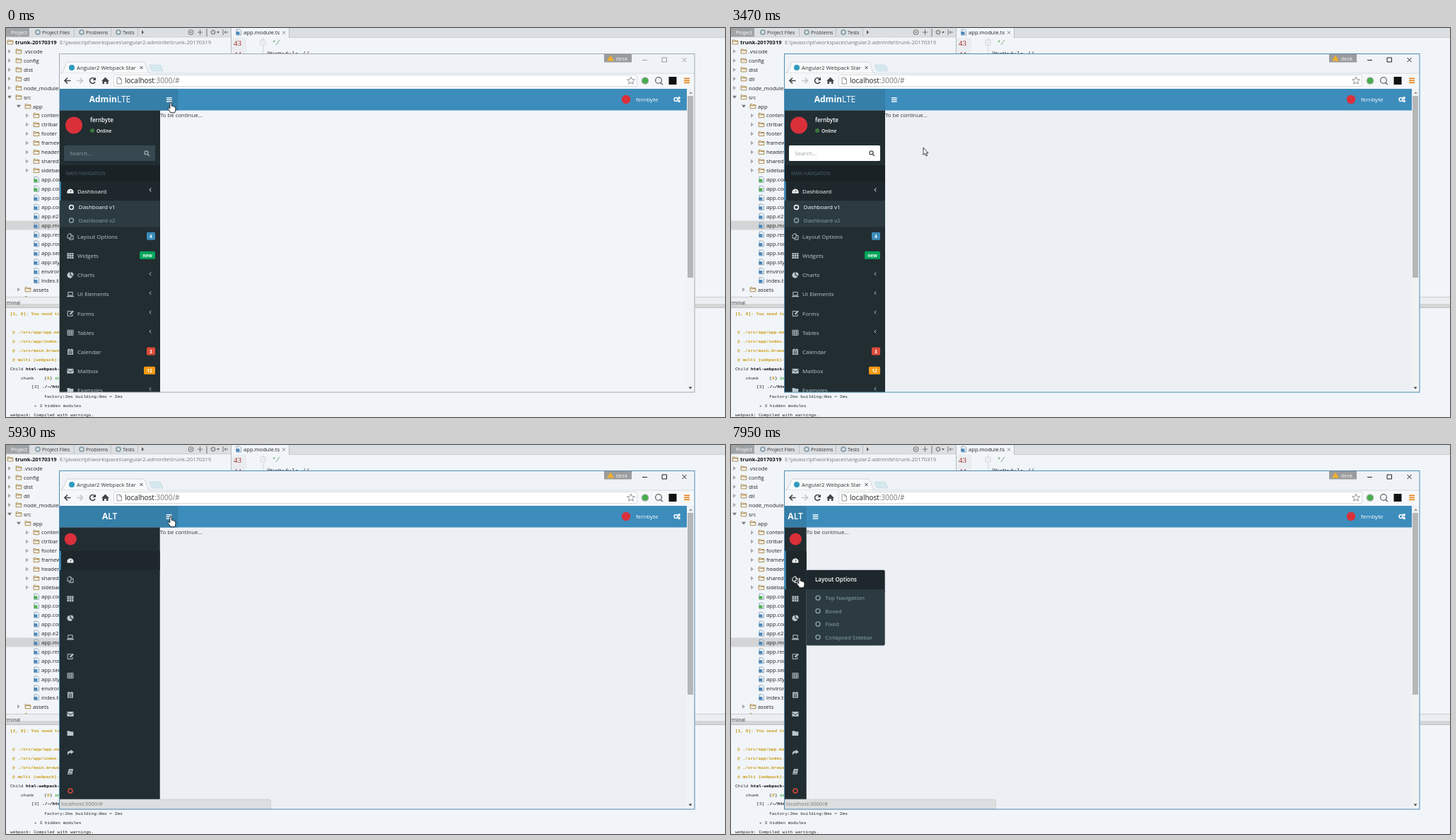
Write an HTML page that moves like this. It is 1017x550 px and loops after 8 s.

```html
<!DOCTYPE html>
<html lang="en">
<head>
<meta charset="utf-8">
<title>Admin dashboard sidebar</title>
<style>
html, body { margin: 0; width: 100%; height: 100%; overflow: hidden; background: #f1f5f9; }
svg { display: block; width: 1017px; height: 550px; }
text { font-family: "Open Sans", "Noto Sans", sans-serif; white-space: pre; }
.mono { font-family: "Liberation Mono", monospace; }
.row { color: #b8c7ce; }
.row .bg { opacity: 0; }
.row.on, .row.active { color: #fff; }
.row.on .bg, .row.active .bg { opacity: 1; }
.sub { color: #8aa4af; }
.sub.on, .sub.active { color: #fff; }
</style>
</head>
<body>
<svg id="stage" viewBox="0 0 1017 550" xmlns="http://www.w3.org/2000/svg"></svg>
<script>
const LOOP = 8000;
const ROW = 27.15;
const WIDE = 218, SLIM = 106.7;
const USER = "fernbyte";

// Bursts of screen updates: start, end, number of updates
const BURSTS = [
  [0, 0, 1], [150, 1190, 8], [1340, 2270, 8], [2390, 3040, 6], [3320, 3470, 2],
  [3750, 3750, 1], [4020, 4800, 7], [5930, 6870, 8], [6990, 7950, 8]
];

// Pointer path: time, x, y
const PATH = [
  [0, 233, 105], [150, 233, 108], [450, 222, 156], [600, 190, 180], [750, 175, 200],
  [1190, 165, 455], [1340, 165, 470], [1600, 162, 508], [1900, 190, 330], [2140, 225, 140],
  [2270, 233, 111], [2390, 225, 122], [2650, 160, 170], [2780, 135, 176], [3040, 130, 176],
  [3320, 200, 176], [3470, 272, 169], [3750, 272, 169], [4020, 266, 158], [4410, 240, 112],
  [4800, 233, 101], [6330, 233, 101], [6870, 165, 128], [7130, 106, 152], [7264, 97, 155],
  [7540, 97, 157], [7810, 97, 179], [7950, 97, 187]
];

const rect = (x, y, w, h, fill, more = "") =>
  `<rect x="${x}" y="${y}" width="${w}" height="${h}" fill="${fill}" ${more}/>`;
const text = (x, y, s, size, fill = "currentColor", more = "") =>
  `<text x="${x}" y="${y}" font-size="${size}" fill="${fill}" ${more}>${s}</text>`;
const dot = (x, y, r, fill, more = "") => `<circle cx="${x}" cy="${y}" r="${r}" fill="${fill}" ${more}/>`;
const fill = (d, color = "currentColor", more = "") => `<path d="${d}" fill="${color}" ${more}/>`;
const line = (d, color = "currentColor", w = 1) =>
  `<path d="${d}" fill="none" stroke="${color}" stroke-width="${w}"/>`;
const at = (x, y, s, more = "") => `<g transform="translate(${x} ${y})" ${more}>${s}</g>`;
const BOLD = 'font-weight="bold"', SEMI = 'font-weight="600"', MID = 'text-anchor="middle"';

const ring = line("M-3 0A3 3 0 1 0 3 0A3 3 0 1 0-3 0", "currentColor", 1.4);
const grid = [0, 1, 2].flatMap(r => [0, 1, 2].map(c => rect(c * 3.2 - 4.6, r * 2.8 - 4, 2.7, 2.2, "currentColor"))).join("");
const lens = (color) => line("M-3-.6A2.5 2.5 0 1 0 2-.6A2.5 2.5 0 1 0-3-.6M1.3 1.3L4 4", color, 1.4);

const ICONS = {
  dash: fill("M-4.3 3.2A4.6 4.6 0 1 1 4.3 3.2Z") + line("M0 2L1-1.5M-3 .8H-2.2M2.2.8H3M-1.8-1.8L-1.3-1.3", "#1e282c", .9),
  files: line("M-4-2L-2-4H1V2H-4ZM1-1.5H4V4.2H-1.2V2"),
  grid,
  pie: fill("M-.5-4A4.2 4.2 0 1 0 3.2 2.4L-.5 0Z") + fill("M.6-4.3A4.2 4.2 0 0 1 4.5 0L4 1.4.6-.6Z"),
  laptop: line("M-3.2-3H3.2V1.6H-3.2Z") + rect(-5, 2.4, 10, 1.3, "currentColor"),
  edit: line("M1.8-3.2H-3.8V3.6H3V.8") + fill("M-1 1.6L-.6-.4 3.4-4.2 4.9-2.8 1 1.2Z"),
  table: line("M-4-3.5H4V3.6H-4ZM-4-1.2H4M-4 1.2H4M-1.3-3V3.6M1.4-3V3.6", "currentColor", .9),
  cal: fill("M-4-3.4H-2.6V-4.6H-1.4V-3.4H1.4V-4.6H2.6V-3.4H4V4.2H-4Z") + line("M-3.3-1.5H3.3M-3.3.6H3.3M-3.3 2.4H3.3M-1.2-1.5V3.6M1.2-1.5V3.6", "#222d32", .6),
  mail: fill("M-4.6-3.3H4.6V3.4H-4.6Z") + line("M-4.6-2L0 1.2 4.6-2", "#222d32", .9),
  folder: fill("M-4.4-3.3H-1L0-2.2H4.3V3.4H-4.4Z"),
  share: fill("M.8-4L4.8-.8.8 2.2V.6Q-3 .4-3.6 4-6-2.2.8-2.4Z"),
  book: fill("M-2-3.8H4L2.4 3.8H-4.2Z") + line("M-1-1.8H2.4M-1.5 0H1.9M-3.5 2.5H2", "#222d32", .7),
  ring
};

const MENU = [
  ["dash", "Dashboard"],
  ["files", "Layout Options", "4", "#3c8dbc", 12],
  ["grid", "Widgets", "new", "#00a65a", 22],
  ["pie", "Charts"], ["laptop", "UI Elements"], ["edit", "Forms"], ["table", "Tables"],
  ["cal", "Calendar", "3", "#dd4b39", 12],
  ["mail", "Mailbox", "12", "#f39c12", 16],
  ["folder", "Examples"], ["share"], ["book"], ["ring", "", "", "#dd4b39"], ["ring", "", "", "#f39c12"]
];

const rowShell = (y, inner, active) =>
  `<g class="row ${active ? "active" : ""}" transform="translate(0 ${y})">` +
  `<g class="bg">${rect(76, -13.5, 142, ROW, "#1e282c")}${rect(76, -13.5, 1.8, ROW, "#3c8dbc")}</g>${inner}</g>`;

const wideY = i => i ? 295 + ROW * (i - 1) : 230.5;
const slimY = i => 163.2 + ROW * i;

function wideRow([icon, label, tag, color, w], i) {
  const side = tag
    ? rect(211 - w, -6.3, w, 11, color, 'rx="1.6"') + text(211 - w / 2, 1.6, tag, 6.6, "#fff", `${BOLD} ${MID}`)
    : line("M205.2-4L203-1.7 205.2.6");
  return rowShell(wideY(i), at(91, 0, ICONS[icon]) + text(101, 3, label, 8) + side, i === 0);
}

function slimRow([icon, , , color], i) {
  const mark = at(91, 0, ICONS[icon], icon === "ring" ? `style="color:${color}"` : "");
  return rowShell(slimY(i), mark, i === 0);
}

const subItem = (x, y, label, active) =>
  `<g class="sub ${active ? "active" : ""}">${at(x, y, ring)}${text(x + 10.3, y + 2.9, label, 8)}</g>`;

function flyout(id, i, title, items) {
  const y = slimY(i) - 13.6, h = items.length * 18.5 + 5.5;
  return `<g id="${id}">` + rect(106.5, y, 111.2, ROW + 5, "#1e282c", 'rx="2"') +
    rect(106.5, y + ROW, 111.2, h, "#2c3b41", 'rx="2"') +
    text(119, y + 16, title, 8, "#fff", SEMI) +
    items.map((s, k) => subItem(123, y + 39.4 + k * 18.5, s, i === 0 && k === 0)).join("") + "</g>";
}

const folderIcon = (x, y) => at(x, y, line("M-3.8-3H-1L0-2H3.8V3H-3.8ZM-3.8-1H3.8", "#a9803c", .9));
const fileIcon = (x, y, color) => at(x, y, line("M-3-4H1.5L3.5-2V4H-3Z", "#7f98ab", .8) + rect(-3.6, -.8, 5, 4.3, color));
const twist = (x, y, open) => fill(open ? `M${x - 3} ${y - 2}h6l-3 4Z` : `M${x - 2} ${y - 3}v6l4-3Z`, open ? "#777" : "#aaa");

function tree() {
  const rowY = i => 33 + 12.95 * i;
  const out = [];
  const dir = (i, x, name, open) =>
    out.push(twist(x - 20, rowY(i), open), folderIcon(x - 7, rowY(i)), text(x, rowY(i) + 2.8, name, 7.7, "#222"));
  out.push(rect(0, 272.5, 76, 13, "#d4d5d6"));
  [".vscode", "config", "dist", "dll", "node_modules", "src"].forEach((s, i) => dir(i, 25, s, s === "src"));
  dir(6, 38, "app", true);
  ["content", "ctrlbar", "footer", "framework", "header", "shared", "sidebar"].forEach((s, i) => dir(i + 7, 50, s));
  ["app.component", "app.component", "app.component", "app.component", "app.e2e", "app.module", "app.resolver",
    "app.routes", "app.service", "app.style", "environment", "index.ts"].forEach((s, i) =>
    out.push(fileIcon(43, rowY(i + 14), i < 2 ? "#4caf50" : "#4a86b8"), text(50, rowY(i + 14) + 2.8, s, 7.7, "#222")));
  dir(26, 38, "assets");
  out.push(folderIcon(31, rowY(27)));
  return out.join("");
}

function terminal() {
  const mono = (x, y, s, color = "#222", more = "") => text(x, y + 2.2, s, 6.17, color, `class="mono" ${more}`);
  const gold = "#c99a10";
  return rect(0, 380, 1017, 11, "#eceff2") + rect(0, 380, 1017, 1, "#c9cdd0") + rect(0, 390, 1017, 6, "#d3d5d7") +
    rect(0, 395, 1017, 1, "#bfc2c4") + rect(0, 396, 1017, 154, "#f1f5f9") + text(-1, 390.5, "rminal", 7, "#333") +
    mono(6, 404, "[1, 8]: You need to", gold, BOLD) +
    [[430, "./src/app/app.mo"], [443, "./src/app/index."], [455.5, "./src/main.brows"], [468.5, "multi (webpack)-"]]
      .map(([y, s]) => mono(9, y, "@ " + s, gold, BOLD)).join("") +
    mono(6, 482, "Child") + mono(28, 482, "html-webpack-", "#000", BOLD) +
    mono(21, 494.5, "chunk") + mono(54, 494.5, "{") + mono(58, 494.5, "0", gold, BOLD) + mono(62, 494.5, "}") +
    mono(69, 494.5, "in", "#2ba52b", BOLD) + mono(36, 507, "[3]") + mono(51, 507, "./~/html", "#000", BOLD) +
    mono(54, 520.5, "factory:2ms building:0ms = 2ms") + mono(40, 533.5, "+ 3 hidden modules") +
    mono(6, 546.5, "webpack: Compiled with warnings.");
}

function ide() {
  const tab = (x, s) => dot(x - 6, 6, 4, "#8ca3b0") + dot(x - 6, 6, 2, "#e2e5e7") + text(x, 8.6, s, 7.1, "#333");
  return rect(0, 0, 1017, 550, "#f1f5f9") + rect(0, 0, 1017, 13, "#dcdfe1") + rect(0, 0, 33, 12.5, "#a1a4a6") +
    text(7, 8.6, "Project", 7.1, "#fff") + tab(51, "Project Files") + tab(113, "Problems") + tab(165, "Tests") +
    [96, 148, 186].map(x => rect(x, 0, .8, 12, "#b8bbbd")).join("") + fill("M192 3v6l3-3Z", "#555") +
    line("M258 6a3.5 3.5 0 1 0 7 0a3.5 3.5 0 1 0-7 0M260 4.5l3 3m0-3l-3 3M274.500 2v8M271 6h7M284 1v11", "#666", .9) +
    dot(293, 6, 2.6, "none", 'stroke="#666" stroke-width="1.8" stroke-dasharray="1.3 .7"') +
    fill("M298 5h4l-2 2.500Z", "#555") + line("M307 2v8M309 6h5M311 4l-2 2 2 2", "#666", .9) +
    rect(0, 12.5, 318, .7, "#c4c7c9") + folderIcon(6, 20) + text(13, 22.8, "trunk-20170319", 7.6, "#111", BOLD) +
    text(76, 22.8, "E:\\javascript\\workspaces\\angular2-adminlte\\trunk-20170319", 7.6, "#777") +
    rect(318, 0, 1, 380, "#b9bdc0") + rect(319, 0, 82, 13.5, "#f1f5f9") + rect(400, 0, 1, 13, "#b9bdc0") +
    fileIcon(329, 6, "#4a86b8") + text(336, 9, "app.module.ts", 7.6, "#222") + line("M391 4.500l4 4m0-4l-4 4", "#666", .8) +
    rect(400, 13, 617, .8, "#c4c7c9") + rect(319, 14, 21, 23, "#eaedf0") +
    text(322, 24.5, "43", 11, "#a82c2c", 'style="font-family:\'Liberation Serif\',serif"') +
    text(322, 40.5, "44", 11, "#a82c2c", 'style="font-family:\'Liberation Serif\',serif"') +
    line("M364 14v4M360 17h7v7h-7ZM361.500 20.500h4M364 24v12", "#c4c9cd", .7) +
    text(376, 24, "*/", 9, "#5c9a5c", 'class="mono" font-style="italic"') +
    text(369, 40, "@NgModule //", 8.3, "#333", 'class="mono"') + tree() + terminal();
}

function browser() {
  return rect(75, 36, 899.5, 479.5, "#eff3f7") +
    fill("M77 64Q81 63 83 56L85 50Q86 48 89 48H193Q196 48 197 51L200 60Q201 64 204 64Z", "#f7f9fa", 'stroke="#c2c8cc" stroke-width=".7"') +
    fill("M203 52H217Q219 52 220 55L222 61H208Q206 61 205 58Z", "#d5e8ee", 'stroke="#bcd3db" stroke-width=".5"') +
    rect(76, 64, 898, 21.5, "#f5f7f9") + rect(204, 63.7, 770, .7, "#c9ced2") +
    dot(93, 56, 4, "#2f9ac0") + text(100, 58.8, "Angular2 Webpack Star", 7.75, "#333") +
    line("M189.500 54l4 4m0-4l-4 4", "#444", 1) +
    rect(846, 36.5, 39, 12, "#9a9b9c") + fill("M855 38.500L860 46.500H850Z", "#f0ae2b") + text(862.5, 45.6, "desk", 7.7, "#f4f4f4") +
    `<g id="controls">${line("M900 45.500h7M928 42h6.500v6h-6.500ZM956.500 42l6 6m0-6l-6 6", "currentColor", 1)}</g>` +
    line("M91.500 74.500H83.500M87 70.500L83 74.500 87 78.500", "#444", 1.7) + line("M100 74.500H108M104.500 70.500L108.500 74.500 104.500 78.500", "#c3c7ca", 1.7) +
    line("M125.500 72A3.900 3.900 0 1 0 126 76", "#444", 1.6) + fill("M127 69.500V74H122.500Z", "#444") +
    fill("M135 75L140.500 69.500 146 75H144.500V79H142V76H139V79H136.500V75Z", "#444") +
    rect(152.5, 66.5, 740, 16, "#fff", 'stroke="#cfd4d8" stroke-width=".8" rx="1.5"') +
    line("M157 70h4l2.500 2.500V79h-6.500ZM161 70v2.500h2.500", "#888", .9) +
    text(168, 78.2, 'localhost<tspan fill="#777">:3000/#</tspan>', 10, "#222") +
    fill("M884 69l1.500 3.600 3.900.3-3 2.500 1 3.800-3.400-2-3.400 2 1-3.800-3-2.500 3.900-.3Z", "none", 'stroke="#777" stroke-width=".8"') +
    dot(904, 74.5, 5.3, "#a8b0a9") + dot(904, 74.5, 4, "#45ad4b") +
    dot(923, 74, 4.4, "none", 'stroke="#666" stroke-width="1.3"') + line("M925 77l4 3", "#666", 1.5) +
    rect(937.5, 69, 11, 11, "#111") + [70.5, 73.5, 76.5].map(y => rect(959, y, 8, 1.7, "#e8851c")).join("");
}

function page() {
  const search = `<g id="search">${rect(82, 166, 129, 22, "currentColor", 'rx="1.5"')}</g>` +
    text(90.500, 179.800, "Search...", 7.8, "#94a0a6") + rect(90, 171, .8, 12, "#333", 'id="caret"') +
    `<g id="lens">${at(199, 177, lens("currentColor"))}</g>`;
  const wide = text(147, 105.4, `<tspan ${BOLD}>Admin</tspan>LTE`, 12, "#fff", MID) +
    dot(96, 137.5, 12, "#d9303a") + text(119, 133, USER, 8, "#fff", SEMI) + dot(122, 145, 3, "#3c763d") +
    text(128, 147.5, "Online", 6.7, "#fff", SEMI) + search + rect(76, 194, 142, 23, "#1a2226") +
    text(85, 208.3, "MAIN NAVIGATION", 6.4, "#4b646f") + rect(76, 244, 142, 37.4, "#2c3b41") +
    subItem(92.5, 253.5, "Dashboard v1", true) + subItem(92.5, 272, "Dashboard v2") +
    `<g id="wideRows">${MENU.slice(0, 10).map(wideRow).join("")}</g>`;
  const slim = `<g id="mini">${text(91.7, 105.4, `<tspan ${BOLD}>A</tspan><tspan ${SEMI}>LT</tspan>`, 12, "#fff", MID)}</g>` +
    dot(91.3, 133, 8.6, "#d9303a") + `<g id="slimRows">${MENU.map(slimRow).join("")}</g>`;
  const gear = (x, y, r) => dot(x, y, r, "none", `stroke="#fff" stroke-width="1.5"`);

  return rect(76, 86, 887, 429, "#ecf0f5", 'id="content"') + rect(76, 86, 887, 30.5, "#3c8dbc") +
    dot(877, 101, 6.2, "#d9303a") + text(891, 104, USER, 8, "#fff") +
    gear(947.5, 101, 2.4) + gear(952, 98.8, 1.1) + gear(952, 103.3, 1.1) +
    `<g id="shift">${rect(0, 86, 25.5, 30.5, "#367fa9", 'id="toggle"')}` +
    [98, 100.7, 103.4].map(y => rect(8.9, y, 7.8, 1.4, "#fff")).join("") + text(0, 126, "To be continue...", 7.8, "#333") + "</g>" +
    `<g clip-path="url(#sideClip)">${rect(76, 86, 142, 30.5, "#367fa9")}${rect(76, 116.5, 142, 399, "#222d32")}` +
    `<g id="wide">${wide}</g><g id="slim">${slim}</g></g>` +
    flyout("fly0", 0, "Dashboard", ["Dashboard v1", "Dashboard v2"]) +
    flyout("fly1", 1, "Layout Options", ["Top Navigation", "Boxed", "Fixed", "Collapsed Sidebar"]) +
    rect(963, 86, 11, 429, "#f1f2f4") + rect(964, 96, 8, 257, "#b4b6b8") +
    fill("M966 93h5l-2.500-3Z", "#999") + fill("M965.500 507.500h5l-2.500 3Z", "#444") +
    `<g id="status">${fill("M76 501H372Q374.500 501 374.500 503.500V515H76Z", "#dcdedf", 'stroke="#c4c7c9" stroke-width=".6"')}` +
    text(78, 510.3, "localhost:3000/#", 7.6, "#777") + "</g>" +
    rect(75.5, 36.5, 898.5, 478.5, "none", 'id="frame"');
}

const pointers =
  `<g id="pointer"><g id="hand">${fill("M-1.200 1Q0-.6 1.200 1V5.200Q2.500 4.600 3 5.900 4.400 5.300 5 6.600 6.700 6.200 6.900 8V11Q6.600 13 5.500 14.800H-.2Q-1 12.300-3.900 9.400-4.200 7.600-2.600 7.800L-1.200 9Z", "#fff", 'stroke="#111" stroke-width=".9"')}</g>` +
  `<g id="arrow">${fill("M0 0V10.400L2.300 8.300 4 12 5.600 11.300 4 7.800H7Z", "#fff", 'stroke="#111" stroke-width=".8"')}</g>` +
  `<g id="beam">${line("M-2-5H2M0-5V5M-2 5H2", "#444", .9)}</g></g>`;

const $ = id => document.getElementById(id);
$("stage").innerHTML =
  `<defs><clipPath id="sideClip">${rect(76, 86, 142, 429, "#000", 'id="sideBox"')}</clipPath></defs>` +
  ide() + browser() + page() + pointers;

const show = (id, on) => $(id).style.display = on ? "" : "none";
const within = (t, a, b) => t >= a && t < b;
const light = (rows, hit) => [...$(rows).children].forEach((el, i) => el.classList.toggle("on", i === hit));

// Time of the latest screen update
function heldTime(t) {
  const [a, b, n] = BURSTS.filter(([start]) => start <= t).pop();
  if (n === 1 || t >= b) return b;
  const step = (b - a) / (n - 1);
  return a + Math.floor((t - a) / step + .1) * step;
}

function pointerAt(t) {
  const i = Math.max(1, PATH.findIndex(p => p[0] >= t));
  const [t0, x0, y0] = PATH[i - 1], [t1, x1, y1] = PATH[i];
  const k = Math.min(1, (t - t0) / (t1 - t0));
  return [x0 + (x1 - x0) * k, y0 + (y1 - y0) * k];
}

function sideEdge(t) {
  const p = Math.min(1, Math.max(0, (t - 5920) / 300));
  const k = p < .5 ? 2 * p * p : 1 - 2 * (1 - p) ** 2;
  return WIDE + (SLIM - WIDE) * k;
}

function render(now) {
  const t = heldTime(now);
  const [x, y] = pointerAt(t);
  const edge = sideEdge(t);
  const mini = t >= 5920;
  const inSide = x < edge;
  const hit = !inSide ? -1 : (mini ? MENU : MENU.slice(0, 10))
    .findIndex((_, i) => Math.abs(y - (mini ? slimY(i) : wideY(i))) < ROW / 2);
  const onToggle = x >= edge && x < edge + 25.5 && y < 116.5;
  const onSub = !mini && inSide && within(y, 244, 281.4);
  const onInput = !mini && within(x, 82, 188) && within(y, 166, 188);
  const active = t >= 2780, typing = within(t, 2780, 3750);

  $("sideBox").setAttribute("width", edge - 76);
  $("shift").setAttribute("transform", `translate(${edge})`);
  $("mini").setAttribute("transform", `translate(${(edge - 108) / 2})`);
  $("content").setAttribute("fill", active ? "#ecf0f5" : "#f1f4f8");
  $("frame").setAttribute("stroke", active ? "#4f8db3" : "#a3abb1");
  $("controls").style.color = active ? "#222" : "#999";
  $("search").style.color = typing ? "#fff" : "#374850";
  $("lens").style.color = typing ? "#555" : "#9aa7ad";
  show("caret", within(t, 2780, 3320));
  show("toggle", onToggle || within(t, 5920, 6300));
  show("wide", !mini);
  show("slim", mini);
  light("wideRows", hit);
  light("slimRows", hit);
  show("fly0", mini && hit === 0);
  show("fly1", mini && hit === 1);
  show("status", within(t, 150, 440) || within(t, 4650, 6460) || t > 7900);

  const hand = hit >= 0 || onToggle || onSub;
  show("hand", hand);
  show("beam", onInput);
  show("arrow", !hand && !onInput);
  $("pointer").setAttribute("transform", `translate(${x} ${y})`);
}

const start = performance.now();
function tick() {
  render((performance.now() - start) % LOOP);
  requestAnimationFrame(tick);
}
tick();
</script>
</body>
</html>
```
